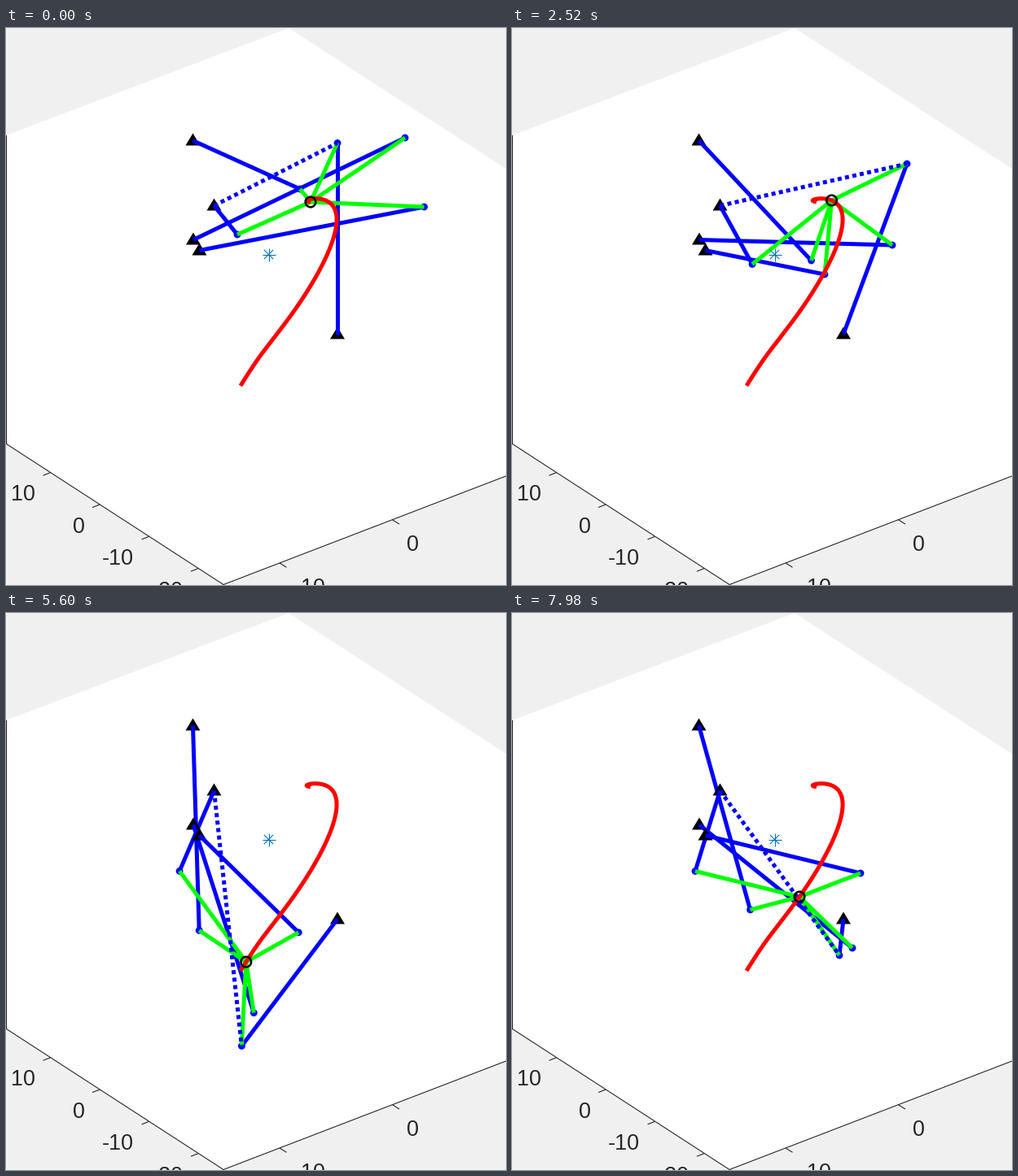
These frames come from a looping animation (614x685 px, 8 s). A matplotlib script:

```python
import matplotlib.pyplot as plt
import numpy as np
from matplotlib.animation import FuncAnimation
from matplotlib.patches import Circle, Polygon

W, H, DPI = 614, 685, 64
PX = 72 / DPI  # points per pixel
FRAMES, LOOP_MS = 115, 8000
LAST_POSE, HOLD_POSE = 84, 40
BLUE, GREEN, RED, INK = "#0000ff", "#00ff00", "#ff0000", "#262626"

BASES = [(229.5, 138.5), (255.5, 218.5), (230, 260.5), (237.5, 273.5),
         (407, 376.5)]

# A few poses along the trajectory, shared by all moving points
STEPS = np.array([0, 20, 36, 48, 54, 65, 83])
ELBOWS = [
    [(361, 198), (378, 255), (367.5, 286), (328, 334), (292.5, 365),
     (260, 383), (231, 392)],
    [(284, 254), (304, 272), (295, 290.5), (248.5, 320), (225, 317.5),
     (214, 316), (213, 317)],
    [(490, 135), (479, 239), (467, 267), (463, 325), (418, 412),
     (357, 467), (290, 499)],
    [(513.5, 220), (423.5, 336), (384, 303), (429, 254.5), (428, 320),
     (392, 371), (353, 398)],
    [(407, 141.5), (440, 134), (485, 167), (470, 319), (402, 421),
     (341.5, 487), (273, 547)],
]
EFFECTOR = [(374, 214), (370.7, 211), (392.5, 212), (391, 286), (353, 349),
            (319, 394), (288, 440)]


def clock(step):
    """Progress that runs fastest mid-trajectory and slows at both ends."""
    return np.arcsinh((step - 47) / 5)


def path(points):
    """Smooth curve through the poses, as a function of clock time."""
    coefs = np.polyfit(clock(STEPS), np.array(points), len(STEPS) - 1)
    return lambda time: np.polyval(coefs, time)


def clock_at(frame):
    """Out and back, holding one frame where trajectory segments meet."""
    pose = min(frame, 2 * LAST_POSE + 1 - frame)
    return clock(pose - (pose >= HOLD_POSE))


fig = plt.figure(figsize=(W / DPI, H / DPI), dpi=DPI, facecolor="#f0f0f0")
ax = fig.add_axes([0, 0, 1, 1])
ax.set(xlim=(0, W), ylim=(H, 0))
ax.axis("off")


def line(points, color, width, z, **style):
    x, y = zip(*points)
    return ax.plot(x, y, color=color, lw=width * PX, zorder=z,
                   solid_capstyle="butt", **style)[0]


def tick(x, y, dx, dy):
    line([(x, y), (x + dx, y + dy)], INK, 1.1, 1)


def label(x, y, text, align):
    ax.text(x, y + 9.4, text, size=27 * PX, color=INK, ha=align,
            va="baseline", family="Liberation Sans")


# Axes box
ax.add_patch(Polygon([(0, 132), (347, 0), (614, 173), (614, 551),
                      (267, 684.5), (0, 511.5)], fc="white", lw=0, zorder=0))
line([(0.5, 132), (0.5, 511.5), (267, 684.5), (614, 551)], INK, 1.1, 1)
for i in range(4):
    tick(54.5 + 60.5 * i, 546.8 + 39.3 * i, -9, 3.5)
    label(36 + 60.5 * i, 572 + 39.5 * i, str(10 - 10 * i), "right")
for i in range(2):
    tick(474.5 - 138.5 * i, 604.8 + 53.2 * i, 8.5, 5.3)
    label(492 - 130 * i, 634 + 53 * i, str(10 * i), "left")

# Star marker
for angle in np.arange(4) * np.pi / 4:
    dx, dy = 8 * np.cos(angle), 8 * np.sin(angle)
    line([(322.5 - dx, 278.5 - dy), (322.5 + dx, 278.5 + dy)],
         "#0072bd", 1.1, 4)

# Mechanism
elbow_paths = [path(points) for points in ELBOWS]
effector_path = path(EFFECTOR)
cranks, rods, joints = [], [], []
for i, (x, y) in enumerate(BASES):
    ax.add_patch(Polygon([(x - 9, y + 6), (x + 9, y + 6), (x, y - 9)],
                         fc="black", lw=0, zorder=2 + i / 10))
    cranks.append(line([(x, y)] * 2, BLUE, 5, 2.05 + i / 10))
    rods.append(line([(x, y)] * 2, GREEN, 5, 3))
    joints.append(ax.add_patch(Circle((x, y), 4.4, fc=BLUE, lw=0, zorder=2.9)))
strut = line([BASES[1]] * 2, BLUE, 5, 3.5, linestyle=(0, (1, 0.85)))
line([effector_path(t) for t in np.linspace(clock(0), clock(83), 300)],
     RED, 5, 5)
ring = ax.add_patch(Circle((0, 0), 6.3, fill=False, ec="black", lw=2.5 * PX,
                           zorder=6))


def connect(artist, a, b):
    artist.set_data([a[0], b[0]], [a[1], b[1]])


def update(frame):
    time = clock_at(frame)
    tip = effector_path(time)
    elbows = [elbow_path(time) for elbow_path in elbow_paths]
    for base, elbow, crank, rod, joint in zip(BASES, elbows, cranks, rods,
                                              joints):
        connect(crank, base, elbow)
        connect(rod, elbow, tip)
        joint.center = elbow
    connect(strut, BASES[1], elbows[-1])
    ring.center = tip
    return [*cranks, *rods, *joints, strut, ring]


anim = FuncAnimation(fig, update, frames=FRAMES, interval=LOOP_MS / FRAMES,
                     repeat=True, repeat_delay=0)
plt.show()
```
